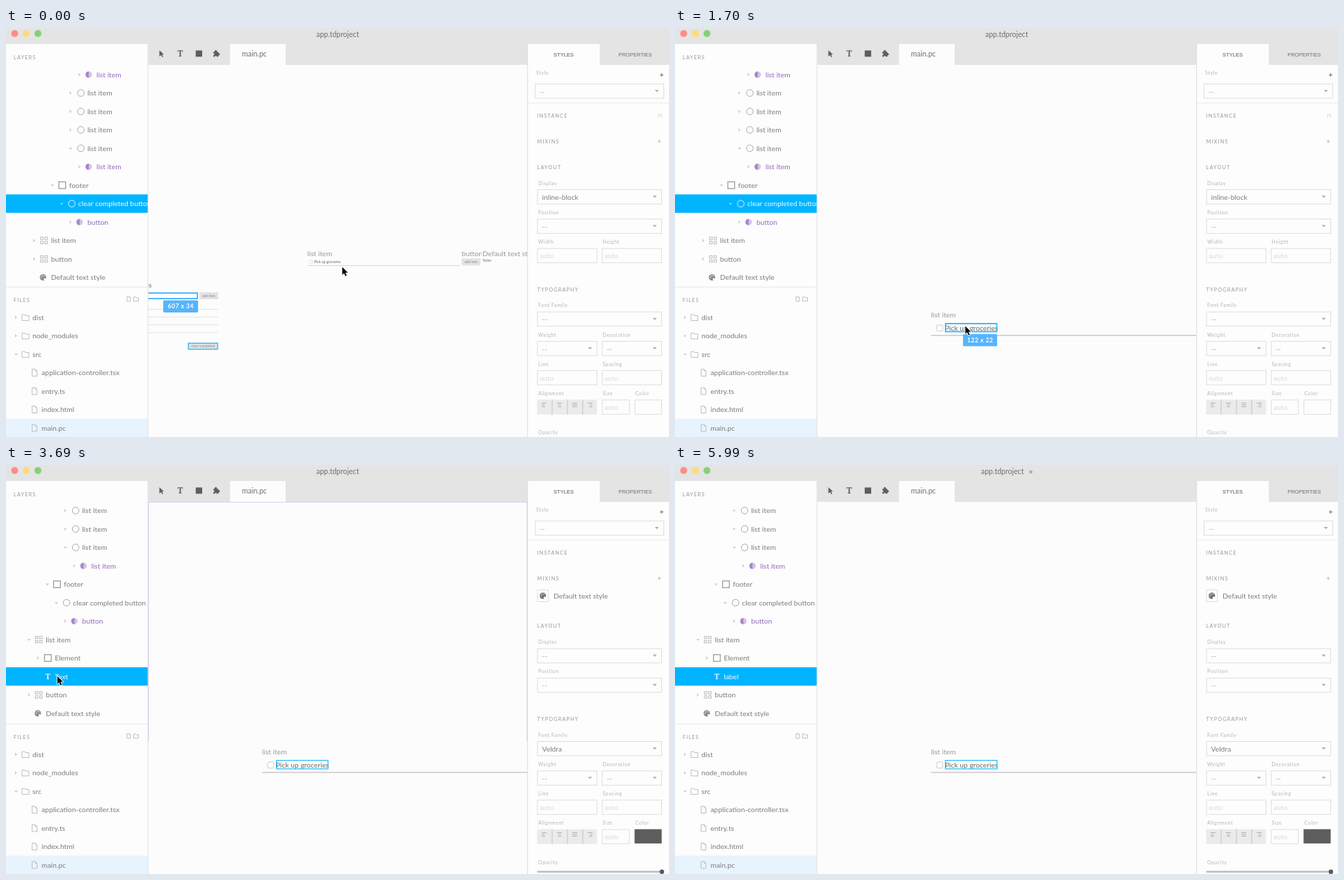
Animation of 953x588 px, one loop 7310 ms. Source, as an HTML page with a canvas:

```html
<!DOCTYPE html>
<html lang="en">
<head>
<meta charset="utf-8">
<title>Layer rename</title>
<style>
html, body { margin: 0; width: 100%; height: 100%; overflow: hidden; background: #fcfcfc; }
canvas { display: block; width: 953px; height: 588px; }
</style>
</head>
<body>
<canvas id="stage"></canvas>
<script>
const W = 953, H = 588, LOOP = 7310, TAU = Math.PI * 2;
const BAR = '#e4e4e4', EDGE = '#dedede', INK = '#7d7d7d', BLUE = '#00b4ff', PURPLE = '#8f6cba';
const canvas = document.getElementById('stage');
const ctx = canvas.getContext('2d');
const dpr = window.devicePixelRatio || 1;
canvas.width = W * dpr;
canvas.height = H * dpr;

// Times of the state changes, ms
const T = { hover: 1700, focus: 2410, select: 2650, fade: 3210, fadeEnd: 3330, blur: 3920,
  edit: 4070, type: 4430, commit: 5250, dirty: 5370 };

const zoomKeys = [[0, 1], [120, 1.5], [300, 1.8], [410, 2]];
const cursorKeys = [
  [0, 483, 343.5], [650, 485, 366], [760, 487, 398], [880, 488, 426], [1000, 489, 429],
  [1110, 481, 430], [1230, 460, 431], [1340, 436, 430], [1700, 417, 428.5], [1820, 416.5, 429],
  [2060, 415.5, 428.5], [3030, 286, 381.5], [3210, 180, 344], [3330, 115, 318], [3450, 84, 307],
  [3570, 75, 304], [3690, 73.5, 303.5], [5640, 731, 510], [5870, 900, 568], [5990, -50, -50]
];
const held = (keys, t) => keys.filter(k => k[0] <= t).pop();

function text(s, x, y, o = {}) {
  const { size = 10.3, color = INK, gap = 0, weight = 400, family = 'Lato', align = 'left' } = o;
  ctx.font = `${weight} ${size}px ${family}, sans-serif`;
  ctx.letterSpacing = gap + 'px';
  ctx.textAlign = align;
  ctx.fillStyle = color;
  ctx.fillText(s, x, y + size * 0.35);
}
function fill(x, y, w, h, color) {
  ctx.fillStyle = color;
  ctx.fillRect(x, y, w, h);
}
function box(x, y, w, h, color = EDGE, lw = 1) {
  ctx.strokeStyle = color;
  ctx.lineWidth = lw;
  ctx.strokeRect(x + lw / 2, y + lw / 2, w - lw, h - lw);
}
function poly(pts, color, close = true, lw = 0) {
  ctx.beginPath();
  for (let i = 0; i < pts.length; i += 2) ctx.lineTo(pts[i], pts[i + 1]);
  if (close) ctx.closePath();
  if (lw) {
    ctx.strokeStyle = color;
    ctx.lineWidth = lw;
    ctx.stroke();
  } else {
    ctx.fillStyle = color;
    ctx.fill();
  }
}
function disc(x, y, r, color, lw = 0, from = 0, to = TAU) {
  ctx.beginPath();
  ctx.arc(x, y, r, from, to);
  ctx.fillStyle = ctx.strokeStyle = color;
  ctx.lineWidth = lw;
  lw ? ctx.stroke() : ctx.fill();
}
function pill(x, y, w, h, r, color) {
  ctx.beginPath();
  ctx.roundRect(x, y, w, h, r);
  ctx.fillStyle = color;
  ctx.fill();
}
function clipped(x, y, w, h, draw) {
  ctx.save();
  ctx.beginPath();
  ctx.rect(x, y, w, h);
  ctx.clip();
  draw();
  ctx.restore();
}
const heading = (s, x, y) => text(s, x, y, { size: 7.3, gap: 1.15, color: '#999' });
const label = (s, x, y) => text(s, x, y, { size: 7.1, gap: 0.6, color: '#b4b4b4' });

function chevron(x, y, open, color = '#cfcfcf') {
  poly(open ? [x - 2.5, y - 1, x + 2.5, y - 1, x, y + 2] : [x - 1.5, y - 2.5, x + 1.5, y, x - 1.5, y + 2.5], color);
}
function plus(x, y, color) {
  fill(x - 2.5, y - 0.5, 5, 1, color);
  fill(x - 0.5, y - 2.5, 1, 5, color);
}
function palette(x, y, color) {
  disc(x, y, 4.6, color);
  for (const [dx, dy] of [[-2.4, 0], [-1, -2.3], [1.5, -2.2]]) disc(x + dx, y + dy, 0.8, '#fff');
  disc(x + 2.6, y + 2.6, 1.6, '#fdfdfd');
}
function letterT(x, y, size, color) {
  text('T', x, y, { size, color, weight: 700, family: '"Noto Serif"', align: 'center' });
}

const icons = {
  circle: (x, y, c) => disc(x, y, 4.8, c || '#a8a8a8', 1),
  square: (x, y) => box(x - 5.5, y - 5.5, 11, 11, '#9c9c9c', 1.3),
  half: (x, y) => {
    disc(x - 1, y, 4.6, '#d4c3e6');
    disc(x - 1, y, 4.6, '#a587c8', 0, Math.PI / 2, Math.PI * 1.5);
  },
  grid: (x, y) => {
    for (const dx of [-5.5, 0.7]) for (const dy of [-5.2, 0.8]) box(x + dx, y + dy, 4.6, 4.4, '#b5b5b5', 0.9);
  },
  palette: (x, y) => palette(x - 1.5, y, '#8a8a8a'),
  text: (x, y, c) => letterT(x, y, 10.5, c || INK)
};

// depth, icon, name, chevron (0 none, 1 closed, 2 open)
const tail = [[0, 'grid', 'button', 1], [0, 'palette', 'Default text style', 0]];
const footer = [[2, 'square', 'footer', 2], [3, 'circle', 'clear completed button', 2], [4, 'half', 'button', 1]];
const item = [4, 'circle', 'list item', 1];
const lastItem = [[4, 'circle', 'list item', 2], [5, 'half', 'list item', 1]];
const before = [[5, 'half', 'list item', 1], item, item, item, ...lastItem, ...footer,
  [0, 'grid', 'list item', 1], ...tail];
const after = [item, item, ...lastItem, ...footer,
  [0, 'grid', 'list item', 2], [1, 'square', 'Element', 1], [1, 'text', 'Text', 0], ...tail];

function renameField(t, x, y) {
  const typed = 'label'.slice(0, t < T.type ? 0 : 1 + Math.floor((t - T.type) / 117));
  const name = typed || 'Text';
  fill(70, y - 6.5, 134, 13, '#0b9ce9');
  box(69.5, y - 7, 135, 14, '#0a7fe0', 2);
  if (!typed) fill(70.5, y - 5.5, 19.5, 11, '#6cc4f5');
  text(name, x, y, { size: 9.9, color: '#fff' });
  if (typed) fill(x + ctx.measureText(name).width + 0.5, y - 5, 1, 10, '#fff');
}

function layers(t) {
  const chosen = t >= T.select, editing = t >= T.edit && t < T.commit;
  const rows = chosen ? after : before, pick = chosen ? 9 : 7;
  clipped(0, 60, 204, 312, () => rows.forEach(([depth, icon, name, chev], i) => {
    let y = (chosen ? 65.5 : 67) + i * 26.5;
    if (editing) y += i < pick ? 1.6 : i === pick ? 0.5 : -1;
    const x = (chosen ? 57.2 : 64.7) + depth * 13.05, on = i === pick;
    const rowH = editing ? 24.5 : 26.5;
    if (on) fill(0, y - rowH / 2, 204, rowH, BLUE);
    if (chev) chevron(x - 24, y, chev === 2, on ? '#7bd6ff' : undefined);
    icons[icon](x - (icon === 'circle' ? 9.3 : 10), y, on && '#e4f6ff');
    if (on && editing) renameField(t, x + 0.8, y);
    else text(on && t >= T.commit ? 'label' : name, x, y, { color: on ? '#f2fbff' : icon === 'half' ? PURPLE : INK });
  }));
  if (chosen && t < T.fadeEnd) {
    ctx.globalAlpha = t < T.fade ? 1 : 0.5;
    pill(196, 214, 6, 142, 3, 'rgba(0,0,0,.55)');
    pill(5, 364, 170, 6, 3, 'rgba(0,0,0,.55)');
    ctx.globalAlpha = 1;
  }
}

function folder(x, y, k = 1) {
  poly([-5, -4, -1, -4, 0, -2.5, 5, -2.5, 5, 4.5, -5, 4.5].map((v, i) => v * k + (i % 2 ? y : x)), '#b8b8b8', true, 0.9);
}
function page(x, y, k = 1) {
  poly([-3.5, -5, 1, -5, 3.5, -2.5, 3.5, 5, -3.5, 5].map((v, i) => v * k + (i % 2 ? y : x)), '#b8b8b8', true, 0.9);
  poly([x + k, y - 5 * k, x + k, y - 2.5 * k, x + 3.5 * k, y - 2.5 * k], '#b8b8b8', false, 0.8);
}
function files() {
  fill(0, 372, 204, 1, '#e9e9e9');
  heading('FILES', 11, 391);
  page(176.5, 389.5, 0.7);
  folder(187, 389.5, 0.7);
  fill(0, 561.5, 204, 27, '#e8f4fd');
  ['dist', 'node_modules', 'src'].forEach((s, i) => {
    const y = 416 + i * 26.5;
    chevron(14.5, y, i === 2);
    folder(28, y);
    text(s, 38, y);
  });
  ['application-controller.tsx', 'entry.ts', 'index.html', 'main.pc'].forEach((s, i) => {
    const y = 495.5 + i * 26.5;
    page(41, y);
    text(s, 51, y);
  });
}

function tag(s, x, y, w) {
  pill(x, y, w, 17.5, 1.5, '#58b4fb');
  text(s, x + w / 2 + 0.2, y + 9, { size: 8.5, gap: 0.5, weight: 700, color: '#fff', align: 'center' });
}

function artboards(t) {
  const z = held(zoomKeys, t)[1];
  const X = x => 498 + (x - 498) * z;
  const Y = y => 336 + 95 * (z - 1) + (y - 336) * z;
  const rule = (x1, x2, y, c) => fill(X(x1), Y(y), X(x2) - X(x1), 0.75 * z, c);
  const words = (s, x, y, o) => text(s, X(x), Y(y), { size: 5.13 * z, color: '#6a6a6a', ...o });
  const title = (s, x) => text(s, X(x), Y(329.3) - 5.3, { color: '#999' });
  const button = (s, x, y, w, h) => {
    fill(X(x), Y(y), w * z, h * z, '#e3e3e3');
    words(s, x + w / 2, y + h / 2, { align: 'center', color: '#888', size: 4.9 * z });
  };

  title('list item', 433);
  ctx.beginPath();
  ctx.roundRect(X(437), Y(334), 4.4 * z, 4.4 * z, z);
  ctx.strokeStyle = '#c8c8c8';
  ctx.lineWidth = 0.45 * z;
  ctx.stroke();
  words('Pick up groceries', 443, 336);
  rule(433, 652, 341.1, '#cacaca');

  clipped(X(655), 53, X(683.5) - X(655), 535, () => title('button', 655));
  button('add item', 655, 331.3, 27, 10);
  title('Default text style', 685);
  words('Todos', 685, 334.3, { size: 4.9 * z });

  text('Todos', X(209.5), Y(369), { align: 'right', color: '#777' });
  fill(X(150), Y(380), 126 * z, 10 * z, '#fff');
  box(X(150), Y(380), 126 * z, 10 * z, '#55b8f8', 2);
  button('add item', 278, 380, 27, 10);
  for (let i = 0; i < 4; i++) rule(150, 305, 404.3 + i * 11.1, '#dadada');
  button('clear completed', 261.5, 452.5, 43.5, 10);
  box(X(261.5), Y(452.5), 43.5 * z, 10 * z, '#33bdf7', 1.4);
  if (t < 120) tag('607 x 34', 226, 391.5, 50);

  if (t >= T.select) box(388, 424, 75.5, 13.5, '#30c0f8', 1.3);
  else if (t >= T.hover) {
    box(388, 424, 75.5, 13.5, '#48b9f4', 2);
    tag('122 x 22', 414, 440, 49);
  }
}

function caret(x, y) {
  poly([x - 3, y - 1.5, x + 3, y - 1.5, x, y + 1.8], '#b0b0b0');
}
function select(x, y, w, value = '--') {
  box(x, y, w, 21.5);
  text(value, x + 7, y + 11, { color: value === '--' ? '#aaa' : INK });
  caret(x + w - 10.5, y + 10.5);
}
function input(x, y, w) {
  box(x, y, w, 21.5);
  text('auto', x + 3.5, y + 11, { color: '#dadada' });
}

function inspector(t) {
  const chosen = t >= T.select;
  fill(750, 53, 203, 535, '#fdfdfd');
  label('Style', 762, 64.5);
  plus(942.5, 67.5, '#777');
  select(760, 80, 186);
  fill(750, 107.5, 203, 1, '#ececec');
  heading('INSTANCE', 763.5, 126.5);
  if (!chosen) poly([938, 129, 938, 124.5, 942, 124.5, 942, 129], '#d0d0d0', false, 0.8);
  heading('MIXINS', 763.5, 163.5);
  plus(939, 163, '#bbb');
  if (chosen) {
    box(763.5, 179, 16.5, 18);
    palette(771.7, 188, '#6f6f6f');
    text('Default text style', 787, 188);
  }
  let d = chosen ? 31.5 : 0;
  heading('LAYOUT', 763.5, 200.2 + d);
  label('Display', 765, 223.5 + d);
  select(763.5, 232 + d, 179.5, chosen ? '--' : 'inline-block');
  label('Position', 765, 265.5 + d);
  select(763.5, 274.3 + d, 179.5);
  if (!chosen) {
    label('Width', 765, 308);
    label('Height', 857.5, 308);
    input(763.5, 316.5, 86.5);
    input(856.5, 316.5, 86.5);
  }
  d = chosen ? -10.7 : 0;
  heading('TYPOGRAPHY', 763.5, 376 + d);
  label('Font Family', 765, 399 + d);
  select(763.5, 407.7 + d, 179.5, chosen ? 'Veldra' : '--');
  label('Weight', 765, 441.2 + d);
  label('Decoration', 857.5, 441.2 + d);
  select(763.5, 450 + d, 86.5);
  select(856.5, 450 + d, 86.5);
  label('Line', 765, 483.5 + d);
  label('Spacing', 857.5, 483.5 + d);
  input(763.5, 492 + d, 86.5);
  input(856.5, 492 + d, 86.5);
  label('Alignment', 765, 525.7 + d);
  label('Size', 857.5, 525.7 + d);
  label('Color', 904.5, 525.7 + d);
  fill(763.5, 534.3 + d, 86, 21.5, '#ebebeb');
  for (let i = 0; i < 4; i++) {
    const x = 773.5 + i * 22, y = 538.7 + d;
    if (i) fill(x - 11, 534.3 + d, 1, 21.5, '#c4c4c4');
    [7, i === 2 ? 7 : 4, i === 2 ? 7 : 5].forEach((w, k) => {
      const off = i === 0 ? -3.5 : i === 3 ? 3.5 - w : -w / 2;
      fill(x + off, y + k * 2.6, w, 0.9, '#aaa');
    });
  }
  input(856.5, 534.3 + d, 40);
  if (chosen) fill(903.5, 534.3 + d, 39, 20.5, '#5d5d5d');
  else box(903.5, 534.3, 39.5, 21.5);
  label('Opacity', 765, 582 + d);
  if (chosen) {
    pill(763.5, 583.5, 179, 2.5, 1, '#bcbcbc');
    disc(942.8, 584.8, 3.2, '#5a5a5a');
  }
}

function topBar(t) {
  fill(0, 0, W, 23, BAR);
  ['#fc8d89', '#fedb79', '#82d277'].forEach((c, i) => disc(12.5 + i * 16.7, 8, 5, c));
  const dirty = t >= T.dirty;
  text('app.tdproject', dirty ? 440 : 446, 9.7, { size: 10.5, color: '#6f6f6f' });
  if (dirty) disc(511.5, 10, 2.4, '#b0b0b0');

  fill(204, 23, 546, 30, BAR);
  fill(322, 23, 80, 30, '#fcfcfc');
  text('main.pc', 339, 37, { size: 10.6, color: '#707070' });
  const c = '#5e5e5e';
  poly([220.5, 32, 227, 38, 224.4, 38.2, 226, 41.4, 224.6, 42, 223, 38.9, 220.5, 41], c);
  letterT(250.3, 37, 12, c);
  fill(272.7, 32.3, 9.3, 9, c);
  fill(298, 34.3, 7.3, 7, c);
  disc(301.6, 33.5, 1.8, c);
  disc(305.6, 37.8, 1.8, c);
  disc(298.3, 37.8, 1.3, BAR);
  disc(301.6, 41.2, 1.3, BAR);

  fill(750, 23, 203, 30, '#fdfdfd');
  fill(853.5, 23, 100, 30, BAR);
  const tab = { size: 7.5, family: '"Liberation Sans"', align: 'center' };
  text('STYLES', 801.5, 38, { ...tab, color: '#555' });
  text('PROPERTIES', 904.5, 38, { ...tab, color: '#6f6f6f' });
}

function focusRing(t) {
  if (t < T.focus || t >= T.blur) return;
  const c = '#d3d2ea';
  fill(204, 53, 545, 1, c);
  if (t < T.select) return;
  fill(204, 53, 1.3, 344, c);
  fill(748.5, 53, 1.3, 344, c);
}

function pointer(t) {
  const [, x, y] = held(cursorKeys, t);
  ctx.save();
  ctx.translate(x, y);
  ctx.lineJoin = 'round';
  if (t >= T.edit && t < T.commit) {
    const bar = () => {
      ctx.beginPath();
      for (const s of [-1, 1]) {
        ctx.moveTo(-2.8, 1.8 + s * 6);
        ctx.quadraticCurveTo(0, 1.8 + s * 6, 0, 1.8 + s * 4.5);
        ctx.quadraticCurveTo(0, 1.8 + s * 6, 2.8, 1.8 + s * 6);
      }
      ctx.moveTo(0, -3);
      ctx.lineTo(0, 6.6);
      ctx.moveTo(-1.6, 4);
      ctx.lineTo(1.6, 4);
      ctx.stroke();
    };
    ctx.strokeStyle = '#fff';
    ctx.lineWidth = 2.8;
    bar();
    ctx.strokeStyle = '#111';
    ctx.lineWidth = 1.1;
    bar();
  } else {
    const arrow = [0.3, 0, 0.3, 11.4, 2.9, 9, 4.8, 13.2, 6.8, 12.3, 4.9, 8.3, 8.5, 8.2];
    poly(arrow, '#fff', true, 1.8);
    poly(arrow, '#0a0a0a');
  }
  ctx.restore();
}

function frame(now) {
  const t = now % LOOP;
  ctx.setTransform(dpr, 0, 0, dpr, 0, 0);
  fill(0, 0, W, H, '#fcfcfc');
  clipped(204, 53, 546, 535, () => artboards(t));
  fill(0, 23, 204, 565, '#fdfdfd');
  heading('LAYERS', 11, 42);
  layers(t);
  files();
  fill(203.6, 23, 1, 565, '#e0e0e0');
  inspector(t);
  topBar(t);
  fill(749.2, 23, 1, 565, '#dcdcdc');
  focusRing(t);
  pointer(t);
}

const start = performance.now();
(function loop() {
  frame(performance.now() - start);
  requestAnimationFrame(loop);
})();
</script>
</body>
</html>
```
